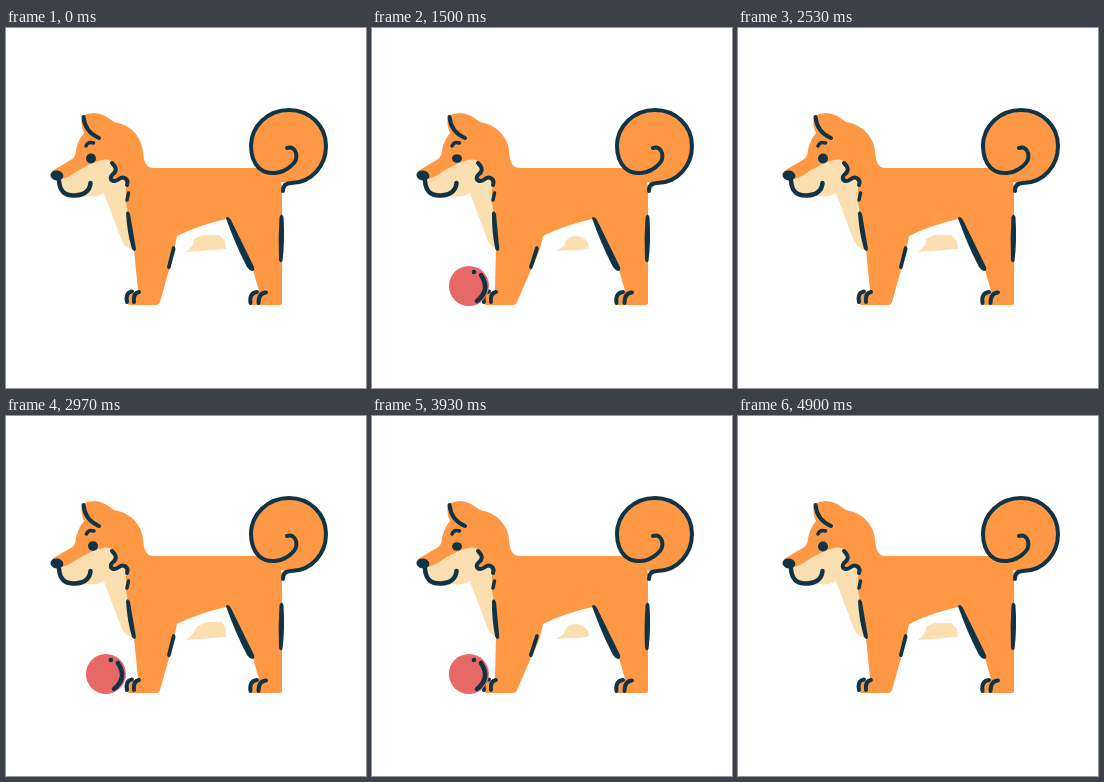
These frames come from a looping animation (360 px wide and 360 px high, 5 s). An HTML page:

```html
<!DOCTYPE html>
<html lang="en">
<head>
<meta charset="utf-8">
<title>Dog and ball</title>
<style>
html, body { margin: 0; width: 100%; height: 100%; overflow: hidden; background: #fff; }
svg { display: block; width: 100vw; height: 100vh; }
.fur { fill: #ff9845; }
.cream { fill: #fbdfb0; }
.ink { fill: #103445; }
.line { fill: none; stroke: #103445; stroke-width: 4; stroke-linecap: round; stroke-linejoin: round; }
.thin { stroke-width: 3.5; }
.thick { stroke-width: 4.5; }
</style>
</head>
<body>
<svg viewBox="0 0 360 360">
  <defs><clipPath id="edge"><rect x="36" y="200" width="300" height="100"/></clipPath></defs>

  <path id="patch" class="cream"/>
  <path class="cream" d="M92 150L122 150L126 190L128 222Q120 221 116 213L98 165Z"/>

  <path id="body" class="fur"/>
  <circle class="fur" cx="283" cy="118" r="37"/>
  <path class="fur" d="M76 88Q88 82 99 88Q104 91 108 94C125 97 136 109 137 124C138 134 140 140 148 140L150 180L122 185L120 157L100 158L56 157L46 143L63 133Q70 130 70 122Q72 112 78 105Q74 96 76 88Z"/>
  <path class="cream" d="M55 151C64 150 70 143 77 140C88 134 97 130 104 132Q108 135 108 142L105 150Q111 154 117 151L121 154L119 168L122 186L116 212L98 165Q90 170 82 168Q70 171 60 167Q54 161 55 151Z"/>

  <path class="line" d="M281 120C291 117 294 131 285 138C276 146 262 148 253 140C247 134 245 126 245 118C245 98 262 82 283 82C304 82 320 98 320 118C320 137 306 155 285 155Q277 155 277 163"/>
  <path class="line" d="M77.500 89Q79 104 93 110"/>
  <path class="line thick" d="M53 153C54 164 59 168 69 167.500C79 167 84 162 84.500 155"/>
  <path class="line" d="M106 135C112 141 110 144 106 147C102 152 108 155 113 151C118 147 123 152 121 157"/>
  <path class="line thin" d="M122.500 165L121 172"/>
  <ellipse class="ink" cx="51" cy="147.500" rx="6.500" ry="5" transform="rotate(8 51 147)"/>

  <path id="brow" class="line thin" d="M80 118Q82 113 87.500 115"/>
  <ellipse id="eye" class="ink" cy="130.500" rx="5"/>

  <path class="ink" d="M220 190Q222 187 225 192L248 239Q249 243 246 243Q243 242 241 239Q229 216 220 190Z"/>
  <path class="ink" d="M273.500 189Q275.500 184 277.500 189Q279 213 276.500 233Q274.500 236 273 232Q272 210 273.500 189Z"/>
  <path class="line" d="M244.500 275Q243 265 251 264M252.500 275Q252.500 265 260 264.500"/>
  <path id="front" class="ink"/>
  <path id="back" class="ink"/>
  <path id="toes" class="line" d="M121 274Q119 265 126 263.500M128 274Q127 265 133 264"/>

  <g clip-path="url(#edge)">
    <g id="ball">
      <circle r="20" fill="#e66867"/>
      <circle class="ink" cx="5" cy="-14" r="2.300"/>
      <path class="line thick" d="M12 -11Q22 4 8 15"/>
    </g>
  </g>
</svg>
<script>
const LOOP = 5000, HALF = 2500, TICK = 1000 / 15;
const $ = id => document.getElementById(id);
const set = (id, attrs) => {
  for (const k in attrs) $(id).setAttribute(k, attrs[k]);
};

// Rows: time in ms, then values
const ROLL_IN = [[66, 10, -214], [100, 18, -195], [467, 100, 0], [533, 110.5, 40]];
const ROLL_OUT = [[0, 97, 0], [333, 48, -68], [533, 18, -110], [600, 8, -124]];
const LOOK_IN = [[66, 85, 5], [167, 81, 4.7], [467, 87, 4.8], [600, 90, 3.7]];
const LOOK_OUT = [[0, 85, 4.2], [333, 80, 4.5], [600, 80, 4.5], [800, 85, 5]];
const KICK = [[0, -9], [67, -12], [267, 0]];

const PATCH = {
  rest: 'M180 224L187 217L188 211L196 207L213 207L219 213L220 221Z',
  near: 'M180 224L187 218Q191 207 203 206L216 206L220 213L220 221Z',
  kick: 'M184 223L192 218Q193 209 204 208Q217 210 217 220Q208 223 196 222Z'
};

function sample(rows, t) {
  if (t <= rows[0][0]) return rows[0].slice(1);
  for (let i = 1; i < rows.length; i++) {
    const a = rows[i - 1], b = rows[i];
    if (t < b[0]) {
      const p = (t - a[0]) / (b[0] - a[0]);
      return a.slice(1).map((v, j) => v + (b[j + 1] - v) * p);
    }
  }
  return rows[rows.length - 1].slice(1);
}

// The drawing advances at fifteen poses per second
function snap(t) {
  const shift = t < 3900 ? TICK / 2 : 0;
  return Math.floor((t - shift + 4) / TICK) * TICK + shift;
}

function drawLeg(d) {
  const knee = d * 0.45, shin = d * 0.3;
  set('body', { d: `M120 140H270L276 158V275Q276 277 273 277H245Q242 275 245 268L253 263L247 242
    Q232 215 220 191Q193 197 171 208Q168 225 ${163 + knee} 242L${154 + d} 274Q${153 + d} 277 ${150 + d} 277
    H${123 + d}Q${119 + d} 275 ${122 + d} 268L${132 + d} 262L${128 + knee} 222L120 185Z` });
  set('front', { d: `M120 185Q122 181 124 186L${130 + shin} 221Q${129 + shin} 225 ${126 + shin} 221
    Q${121 + shin / 2} 204 120 185Z` });
  set('back', { d: `M${166 + shin} 219Q${169 + shin} 216 ${169.500 + shin} 221L${164.500 + knee} 240
    Q${162.500 + knee} 243 ${161 + knee} 239Z` });
  set('toes', { transform: `translate(${d} 0)` });
}

function render(t) {
  const s = snap(t), second = s > HALF - 1;
  const c = second ? s - HALF : s;
  const u = c - (second ? 1433 : 1500);
  const kicked = u > -1;

  const [x, turn] = kicked ? sample(ROLL_OUT, u) : sample(ROLL_IN, c);
  const [ex, ry] = kicked ? sample(LOOK_OUT, u) : sample(LOOK_IN, c);
  const d = kicked ? sample(KICK, u)[0] : 0;

  set('ball', { transform: `translate(${x} 258) rotate(${turn})` });
  set('eye', { cx: ex, ry, cy: 130.500 - Math.max(0, ex - 85) * 0.25 });
  set('brow', { transform: `translate(${(ex - 85) * (ex < 85 ? 0.6 : 0.2)} 0)` });
  set('patch', { d: d < -4 ? PATCH.kick : x > 95 ? PATCH.near : PATCH.rest });
  drawLeg(d);
}

const start = performance.now();
function loop() {
  render((performance.now() - start) % LOOP);
  requestAnimationFrame(loop);
}
loop();
</script>
</body>
</html>
```
